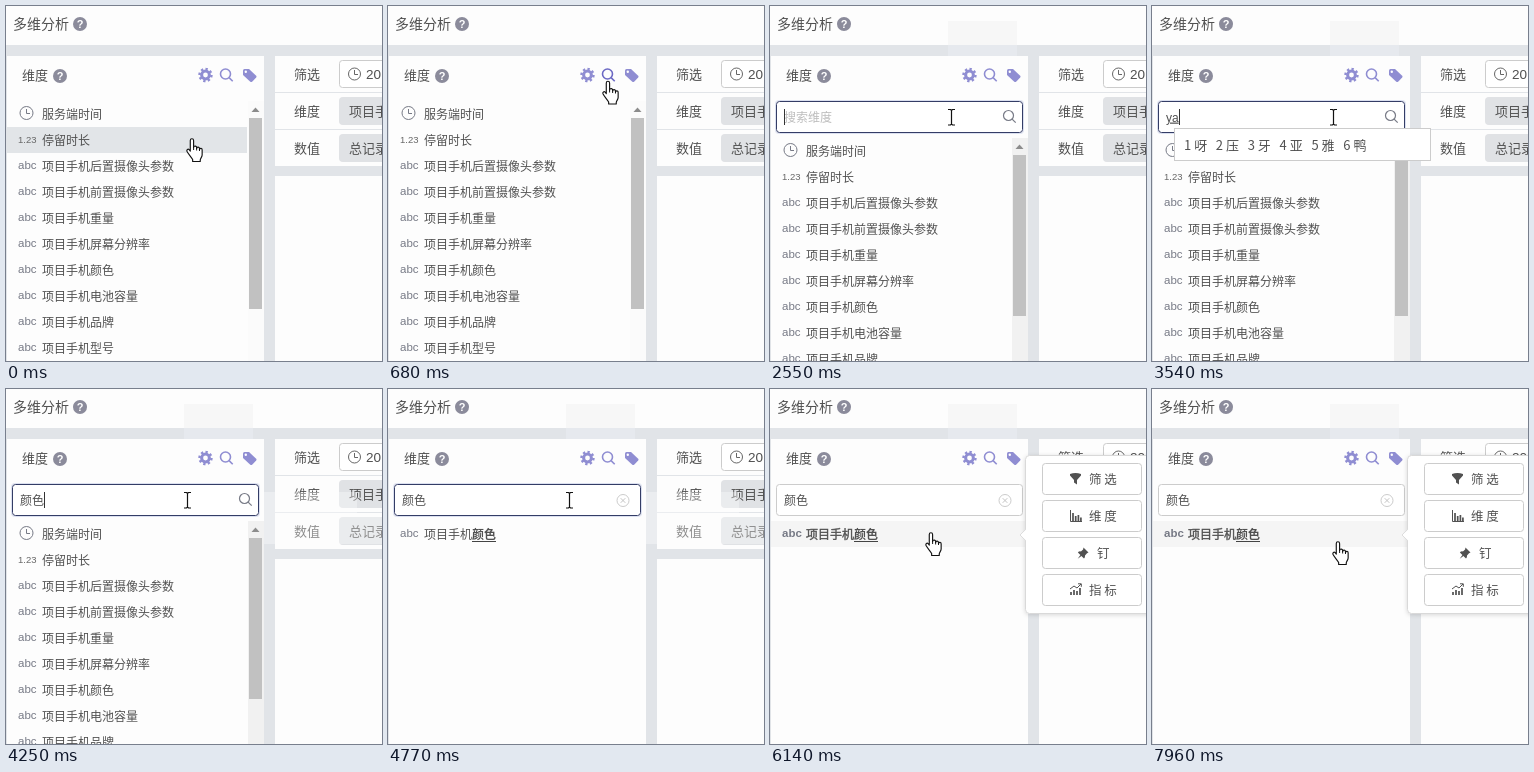
These frames come from a looping animation (376 by 355 pixels, 8000 ms). An HTML page:

```html
<!DOCTYPE html>
<html lang="zh-CN">
<head>
<meta charset="utf-8">
<style>
  html, body { margin: 0; width: 100%; height: 100%; overflow: hidden; background: #e1e4e8; }
  svg { display: block; width: 376px; height: 355px; }
  text { font-family: "Noto Sans CJK SC", "Noto Sans CJK", "Open Sans", sans-serif; white-space: pre; }
  .latin { font-family: "Liberation Sans", Arial, sans-serif; }
</style>
</head>
<body>
<svg id="stage" viewBox="0 0 376 355"></svg>
<script>
const LOOP = 8000;
const INK = '#515151', PURPLE = '#8f8dd2', SLATE = '#777a86';

// Text is placed by its vertical centre.
const text = (x, cy, str, size = 12, attrs = '') =>
  `<text x="${x}" y="${cy + size * 0.38}" font-size="${size}" fill="${INK}" ${attrs}>${str}</text>`;
const rect = (x, y, w, h, fill, attrs = '') =>
  `<rect x="${x}" y="${y}" width="${w}" height="${h}" fill="${fill}" ${attrs}/>`;
const frame = (x, y, w, h, stroke = '#ccc', attrs = '') =>
  rect(x + 0.5, y + 0.5, w - 1, h - 1, '#fff', `rx="3" stroke="${stroke}" ${attrs}`);
const line = (d, stroke, width = 1, attrs = '') =>
  `<path d="${d}" fill="none" stroke="${stroke}" stroke-width="${width}" ${attrs}/>`;
const shape = (d, fill, attrs = '') => `<path d="${d}" fill="${fill}" ${attrs}/>`;
const group = (id, content, attrs = '') => `<g id="${id}" ${attrs}>${content}</g>`;

const help = (x, y) => `<circle cx="${x}" cy="${y}" r="7" fill="#8b8b9b"/>` +
  `<text class="latin" x="${x}" y="${y + 4}" font-size="11" font-weight="bold" text-anchor="middle" fill="#fff">?</text>`;
const clock = (x, y, r = 6, color = SLATE) =>
  `<circle cx="${x}" cy="${y}" r="${r}" fill="none" stroke="${color}"/>` +
  line(`M${x} ${y - 4}V${y + 0.5}H${x + 3.5}`, color);
const lens = (x, y, color, width) =>
  `<circle cx="${x - 1}" cy="${y - 1}" r="5" fill="none" stroke="${color}" stroke-width="${width}"/>` +
  line(`M${x + 2.6} ${y + 2.6}l3.6 3.6`, color, width);
const gear = (x, y) =>
  `<g fill="none" stroke="${PURPLE}"><circle cx="${x}" cy="${y}" r="3.9" stroke-width="3"/>` +
  `<circle cx="${x}" cy="${y}" r="6" stroke-width="2.4" pathLength="16" stroke-dasharray="1"/></g>`;
const tag = shape('M237 64.5q0-1.5 1.5-1.5h4.5l7.2 6.8q.8.9 0 1.8l-4.1 4.1q-.9.8-1.8 0L237 69z', PURPLE) +
  '<circle cx="239.8" cy="65.8" r="1.2" fill="#fff"/>';

const fields = ['服务端时间', '停留时长',
  ...['后置摄像头参数', '前置摄像头参数', '重量', '屏幕分辨率', '颜色', '电池容量', '品牌', '型号'].map(s => '项目手机' + s)];

const abc = (y, attrs = '') =>
  `<text class="latin" x="12" y="${y + 3}" font-size="11.5" fill="${SLATE}" ${attrs}>abc</text>`;
const fieldRow = (name, i) => {
  const y = 108 + i * 26;
  const icon = i === 0 ? clock(20.5, y - 1, 6.5)
    : i === 1 ? `<text class="latin" x="12" y="${y + 3}" font-size="9.5" fill="#666">1.23</text>`
    : abc(y);
  return icon + text(36, y, name);
};

const header = rect(0, 0, 376, 39, '#fdfdfd') + text(7, 17.5, '多维分析', 14) + help(74, 18);

const rightPanel =
  rect(269, 50, 107, 110, '#fdfdfd') + rect(269, 170, 107, 185, '#fdfdfd') +
  rect(269, 86, 107, 1, '#e1e4e8') + rect(269, 123, 107, 1, '#e1e4e8') +
  ['筛选', '维度', '数值'].map((s, i) => text(288, 68 + i * 37, s, 13)).join('') +
  frame(333, 54, 60, 28) + clock(348.5, 68, 6, '#666') +
  `<text class="latin" x="360" y="73" font-size="13.5" fill="${INK}">20</text>` +
  rect(333, 91, 60, 28, '#e0e2e5', 'rx="4"') + text(343, 105, '项目手', 13) +
  rect(333, 128, 60, 28, '#e0e2e5', 'rx="4"') + text(343, 142, '总记录', 13);

const list =
  group('hover', rect(1, 95, 240, 26, '#e2e5e8')) +
  fields.map(fieldRow).join('') +
  rect(242, 95, 16, 260, '#f1f1f1', 'id="track"') + shape('M245.5 106h8l-4-4.5z', '#8c8c8c') +
  rect(243, 112, 13, 191, '#c1c1c1', 'id="thumb"');

const result =
  rect(1, 132, 257, 26, '#e1e1e1', 'id="resultBack"') +
  group('resultText', abc(145) + text(36, 145, '项目手机')) +
  group('resultBold', abc(145, 'font-weight="bold"') + text(36, 145, '项目手机', 12, `stroke="${INK}" stroke-width=".4"`)) +
  text(84, 145, '颜色', 12, 'font-weight="bold"') + rect(84, 152, 24, 1, '#444');

const searchBox =
  frame(5, 94, 249, 34, '#dbe0f0', 'id="glow"') +
  frame(6, 95, 247, 32, '#ccc', 'id="field"') +
  text(14, 111, '搜索维度', 12, 'id="hint" style="fill:#bdbdbd"') +
  text(14, 111, '', 12, 'id="typed"') +
  group('lens', lens(239.5, 110.5, SLATE, 1.2)) +
  group('clear', '<circle cx="235" cy="111.5" r="6" fill="none" stroke="#ccc"/>' +
    line('M232.7 109.2l4.6 4.6m0-4.6l-4.6 4.6', '#c4c4c4')) +
  rect(14, 103, 1, 16, '#333', 'id="caret"');

const tooltip = rect(199, 16, 44, 34, '#555', 'rx="4"') +
  shape('M215.5 50h9l-4.5 4.5z', '#555') + text(209, 33, '搜索', 12, 'style="fill:#fff"');

const menuIcons = [
  shape('M300 85q5.500-2 11 0v1.500l-4 4.500v4.500l-3-2v-2.500l-4-4.500z', INK),
  line('M300.500 121v11.500H312', INK) + line('M303 132v-8m2.700 8v-5m2.700 5v-6m2.500 6v-3.500', INK, 1.7),
  shape('M309.500 158.500l5 5-1.500.7-2 2.300q.3 2-1 3l-2.600-2.600-3.700 2.800 2.700-3.800-2.500-2.500q1-1.300 3-1l2.200-2z', INK, 'transform="translate(4 0)"'),
  line('M301 206v-3m3 3v-5m3 5v-4m3 4v-7', INK, 1.7) + line('M300 200l4-3 3 2 4-4m-3-.2h3.300v3', INK)
];
const menu =
  rect(255.5, 66.5, 140, 158, '#fff', 'rx="4" stroke="#d9d9d9" filter="url(#soft)"') +
  shape('M256.500 140l-6 6 6 6z', '#fff') + line('M255.500 140.500l-5.500 5.500 5.500 5.500', '#ddd') +
  ['筛 选', '维 度', '钉', '指 标'].map((label, i) =>
    frame(272, 74 + i * 37, 100, 32) + menuIcons[i] +
    text(i === 2 ? 327 : 319, 90.5 + i * 37, label, 12.5)).join('');

const hand = group('handShape', shape('M4.5 13V2.500a1.750 1.750 0 0 1 3.500 0V9.500a1.600 1.600 0 0 1 3.200.3v.7a1.500 1.500 0 0 1 3 .3v.8a1.400 1.400 0 0 1 2.800.4V17c0 2-2 3.500-2 5v1.500H7v-2C5.500 19 2 15.500 1 13.200c-.6-1.700 1.200-2.600 2.300-1.500z',
  '#fff', 'stroke="#111" stroke-width="1.2" stroke-linejoin="round"') + line('M8 9v3m3.200-2v2.500m3-1.500v2', '#111'),
  'transform="scale(.95 1)"');
const beam = line('M0 .5h2.500l1 1 1-1H7M3.500 1v14.500M0 16h2.500l1-1 1 1H7', '#111', 1.2);

document.getElementById('stage').innerHTML =
  '<defs><filter id="soft"><feDropShadow dx="0" dy="1" stdDeviation="2" flood-opacity=".15"/></filter></defs>' +
  rect(0, 0, 376, 355, '#e1e4e8') + header +
  group('trace', rect(178, 15, 69, 24, '#f7f7f7') + rect(178, 39, 69, 11, '#e6e9ee')) +
  rightPanel +
  group('fade', rect(258, 103, 93, 52, '#fff') + rect(351, 128, 25, 27, '#fff'), 'opacity=".35"') +
  rect(1, 50, 257, 305, '#fdfdfd') +
  text(16, 69.5, '维度', 13) + help(54, 70) + gear(199.5, 69) +
  group('find', lens(220.5, 69, PURPLE, 1.6)) + group('findActive', lens(220.5, 69, '#6c69c4', 1.6)) + tag +
  group('list', list) + group('result', result) + group('search', searchBox) +
  group('tooltip', tooltip) + group('menu', menu) +
  group('ime', rect(22.5, 122.5, 256, 32, '#fff', 'id="imeBox" stroke="#ccc"') + text(32, 139, '', 13, 'id="imeText"')) +
  group('hand', hand) + group('beam', beam);

const ui = {};
document.querySelectorAll('[id]').forEach(el => ui[el.id] = el);

// Each table row: start time, then values held until the next row.
const pointer = [
  [0, 'hand', 180, 132], [120, 'hand', 180, 125], [260, 'hand', 191, 111], [410, 'hand', 203, 90],
  [530, 'hand', 210, 77], [680, 'hand', 214, 74.5], [2030, 'hand', 206, 82], [2150, 'beam', 186, 101],
  [2280, 'beam', 178, 103], [5170, 'beam', 173, 117], [5320, 'hand', 156, 142], [5470, 'hand', 155, 143],
  [7100, 'hand', 167, 143], [7230, 'hand', 176, 143], [7480, 'hand', 177, 144], [7600, 'hand', 178, 146],
  [7720, 'hand', 179, 149], [7840, 'hand', 180, 151], [7960, 'hand', 180, 152]
];
const typing = [
  [0, ''],
  [3260, 'y', 279, '1 有   2 一   3 要   4 也   5 以   6 用'],
  [3540, 'ya', 279, '1 呀   2 压   3 牙   4 亚   5 雅   6 鸭'],
  [3690, "yan's", 351, '1 颜色   2 演示   3 验收   4 掩饰   5 眼神'],
  [3840, "yan'se", 335, '1 颜色   2 眼色   3 燕   4 言   5 严   6 烟'],
  [4120, '颜色']
];
const caret = [[0, 0], [1520, 1], [2030, 0], [2550, 1], [3110, 0], [3260, 1], [4770, 0], [5170, 1], [5750, 0]];
const border = [[0, '#ccc'], [1640, '#8085a0'], [1760, '#343d66'], [5900, '#8085a0'], [6020, '#ccc']];
const tipAlpha = [[0, 0], [840, 1], [2030, 0.7], [2150, 0.25], [2280, 0]];
const menuAlpha = [[0, 0], [6020, 0.5], [6140, 1]];
const rowColor = [[0, 'none'], [5470, '#e1e1e1'], [5900, '#f5f5f5']];

const at = (table, t) => table.findLast(row => t >= row[0]);
const show = (name, on) => ui[name].setAttribute('visibility', on ? 'inherit' : 'hidden');
const set = (name, attrs) => { for (const k in attrs) ui[name].setAttribute(k, attrs[k]); };

function render(t) {
  const [, kind, x, y] = at(pointer, t);
  set(kind, { transform: `translate(${x} ${y})` });
  show('hand', kind === 'hand');
  show('beam', kind === 'beam');

  const open = t >= 1520, filtered = t >= 4770, chosen = t >= 5900;
  const searching = t >= 680 && t < 2030;
  set('list', { transform: `translate(0 ${open ? 37 : 0})` });
  set('thumb', { height: open ? 161 : 191 });
  set('track', { fill: open ? '#f1f1f1' : '#fbfbfb' });
  set('hover', { transform: `translate(0 ${t < 260 ? 26 : 0})` });
  show('find', !searching);
  show('findActive', searching);
  show('hover', t < 410);
  show('list', !filtered);
  show('search', open);
  show('glow', open && t >= 1760 && !chosen);
  show('lens', open && !filtered);
  show('clear', filtered);

  const [, typed, imeRight, candidates] = at(typing, t);
  const composing = Boolean(candidates);
  ui.typed.textContent = typed;
  ui.typed.setAttribute('class', composing ? 'latin' : '');
  set('typed', { 'text-decoration': composing ? 'underline' : 'none' });
  show('hint', !typed);
  show('caret', at(caret, t)[1]);
  set('caret', { x: typed ? 14 + Math.round(ui.typed.getComputedTextLength()) : 14 });
  set('field', { stroke: at(border, t)[1] });
  show('ime', composing);
  if (composing) {
    set('imeBox', { width: imeRight - 23 });
    ui.imeText.textContent = candidates;
  }

  show('result', filtered);
  show('resultText', filtered && !chosen);
  show('resultBold', chosen);
  set('resultBack', { fill: at(rowColor, t)[1] });

  // "inherit" on the hint must not outlive the closed search box.
  set('search', { opacity: open ? 1 : 0 });
  set('tooltip', { opacity: at(tipAlpha, t)[1] });
  set('menu', { opacity: at(menuAlpha, t)[1] });
  show('trace', t >= 2280);
  show('fade', t >= 4120);
}

const start = performance.now();
function tick() {
  render((performance.now() - start) % LOOP);
  requestAnimationFrame(tick);
}
tick();
</script>
</body>
</html>
```
